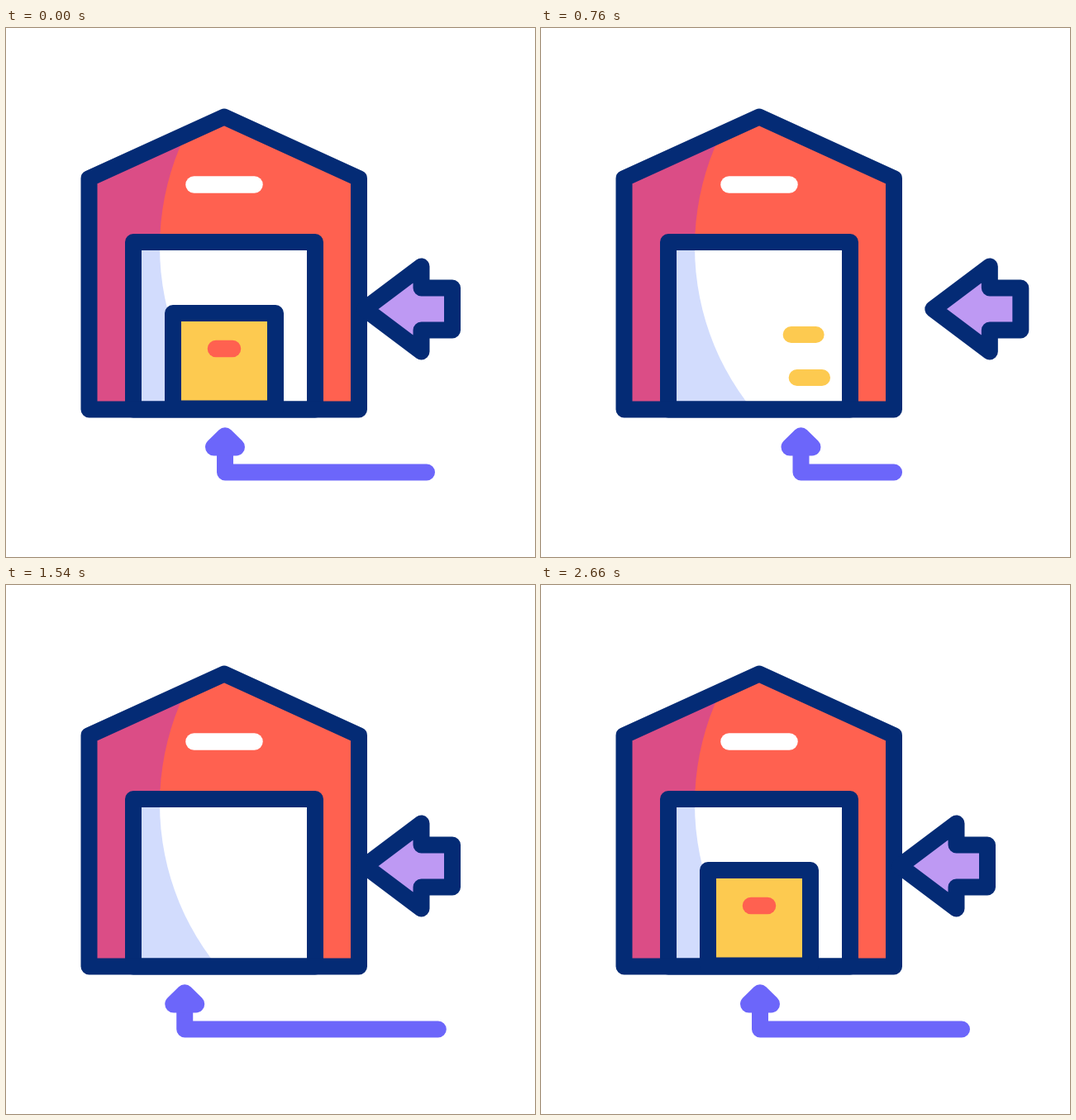
An HTML page with a canvas that plays this animation: 640 px wide and 640 px high, repeating every 2940 ms.

```html
<!DOCTYPE html>
<html lang="en">
<head>
<meta charset="utf-8">
<title>Warehouse delivery</title>
<style>
  html, body { margin: 0; width: 100%; height: 100%; overflow: hidden; background: #fff; }
  canvas { display: block; width: 640px; height: 640px; }
</style>
</head>
<body>
<canvas id="stage" width="640" height="640"></canvas>
<script>
const ctx = document.getElementById('stage').getContext('2d');
const LOOP = 2940;
const NAVY = '#042b75', RED = '#ff6150', YELLOW = '#fdca50', VIOLET = '#6c66fa';
ctx.lineCap = ctx.lineJoin = 'round';

const clamp = v => Math.min(1, Math.max(0, v));
const progress = (t, from, to) => clamp((t - from) / (to - from));
const ease = p => p * p * (3 - 2 * p);
const mix = (a, b, p) => a + (b - a) * p;

// Eased value through [time, value] keys
function keyed(t, keys) {
  let value = keys[0][1];
  for (let i = 1; i < keys.length; i++) {
    value = mix(value, keys[i][1], ease(progress(t, keys[i - 1][0], keys[i][0])));
  }
  return value;
}

function draw(path, stroke, fill, width = 20) {
  const shape = new Path2D(path);
  if (fill) { ctx.fillStyle = fill; ctx.fill(shape); }
  if (stroke) { ctx.strokeStyle = stroke; ctx.lineWidth = width; ctx.stroke(shape); }
}

function clipped(path, paint) {
  ctx.save();
  ctx.clip(new Path2D(path));
  paint();
  ctx.restore();
}

const WALL = 'M100.5 461.5V182L264 107.5L427 182V461.5Z';
const DOOR = 'M154 461.5V259H374V461.5Z';
const LIT = 'M186 265a312 312 0 1 0 624 0a312 312 0 1 0 -624 0Z';

function warehouse() {
  draw(WALL, null, '#db4d86');
  clipped(WALL, () => draw(LIT, null, RED));
  draw(DOOR, null, '#d2dcfd');
  clipped(DOOR, () => draw(LIT, null, '#fff'));
  draw(DOOR, NAVY);
  draw(WALL, NAVY);
  draw('M227.5 189.5H300.5', '#fff', null, 20.5);
}

function crate(shift) {
  ctx.save();
  ctx.translate(shift, 0);
  draw('M202 345H326V460.5H202Z', NAVY, YELLOW);
  draw('M254 388H274', RED, null, 20.5);
  ctx.restore();
}

function speedLine(t, y, headX, length) {
  const head = headX - (t - 1040) * 0.35;
  const tail = Math.min(340, head + length);
  if (head < 340 && tail > 140) draw(`M${head} ${y}H${tail}`, YELLOW);
}

function spark(t, x, y, dx, dy) {
  const a = progress(t, 2420, 2520), b = progress(t, 2260, 2420);
  if (b > 0 && a < 1) {
    draw(`M${x + dx * a} ${y + dy * a}L${x + dx * b} ${y + dy * b}`, YELLOW);
  }
}

function routeArrow(t) {
  const head = keyed(t, [[303, 265], [710, 319], [1136, 205], [1372, 205], [1983, 265]]);
  const tail = keyed(t, [[303, 509], [710, 423], [1136, 526], [1372, 526], [1983, 509]]);
  draw(`M${head} 500V537.5H${tail}`, VIOLET);
  draw(`M${head - 13.5} 507L${head} 493.8L${head + 13.5} 507Z`, VIOLET, VIOLET, 21);
}

function pushArrow(t) {
  ctx.save();
  ctx.translate(keyed(t, [[303, 0], [710, 42], [1136, 0]]), 0);
  draw('M434 340L502.5 288.5V314.5H540V365.5H502.5V391.5Z', NAVY, '#be99f3');
  ctx.restore();
}

function render(t) {
  ctx.clearRect(0, 0, 640, 640);
  warehouse();
  clipped('M164 269H364V471H164Z', () => {
    if (t < 800) crate(-0.000625 * Math.max(0, t - 180) ** 2);
  });
  clipped('M164 269H364V451H164Z', () => {
    speedLine(t, 371, 205, 30);
    speedLine(t, 423, 212, 61);
  });
  routeArrow(t);
  if (t > 1740) crate(457 * (1 - progress(t, 1760, 2660)) ** 2.7);
  pushArrow(t);
  spark(t, 225, 464, -14, 18);
  spark(t, 269.5, 465, 5, 50);
  spark(t, 313, 459, 16, 18);
}

const start = performance.now();
function frame() {
  render((performance.now() - start) % LOOP);
  requestAnimationFrame(frame);
}
frame();
</script>
</body>
</html>
```
